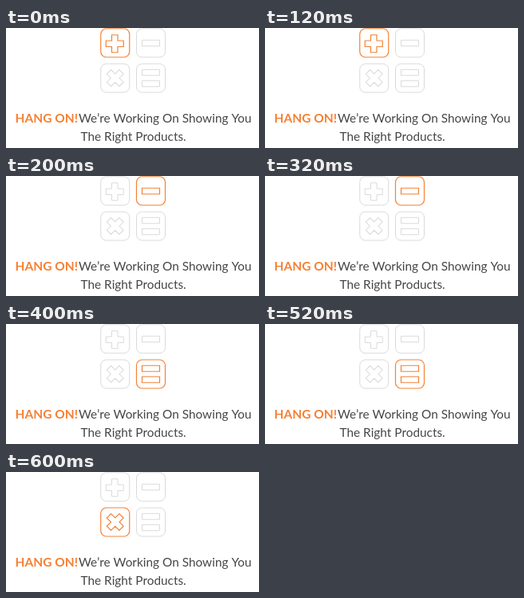
Write an HTML page with a canvas that moves like this. It is 317 px wide and 151 px high and loops after 800 ms.

```html
<!DOCTYPE html>
<html lang="en">
<head>
<meta charset="utf-8">
<style>
html, body { margin: 0; width: 100%; height: 100%; overflow: hidden; background: #fff; }
canvas { display: block; }
</style>
</head>
<body>
<canvas id="stage" width="317" height="151"></canvas>
<script>
const ctx = document.getElementById('stage').getContext('2d');
const ORANGE = '#f58134', GRAY = '#dadada', INK = '#464646';
const STEP = 200;

function bar(y) {
  ctx.rect(-11, y - 3.75, 22, 7.5);
}

function cross(arm, half) {
  for (let i = 0; i < 4; i++) {
    ctx.lineTo(-half, -half);
    ctx.lineTo(-half, -arm);
    ctx.lineTo(half, -arm);
    ctx.rotate(Math.PI / 2);
  }
  ctx.closePath();
}

// Keys in the order they light up, clockwise
const keys = [
  { x: 136.75, y: 18.75, sign() { ctx.translate(-0.5, 1); cross(11, 3.75); } },
  { x: 181.5, y: 18.75, sign() { bar(0.25); } },
  { x: 181.5, y: 63, sign() { bar(-7); bar(7); } },
  { x: 136.75, y: 63, sign() { ctx.rotate(Math.PI / 4); cross(11, 3.75); } }
];

function drawKey(key, lit) {
  ctx.save();
  ctx.translate(key.x, key.y);
  ctx.strokeStyle = lit ? ORANGE : GRAY;
  ctx.lineWidth = lit ? 1.2 : 1;
  ctx.beginPath();
  ctx.roundRect(-18, -18, 36, 36, 7);
  ctx.stroke();
  ctx.beginPath();
  key.sign();
  ctx.stroke();
  ctx.restore();
}

function label(text, x, y, weight, color, size) {
  ctx.font = `${weight} ${size}px Lato, sans-serif`;
  ctx.fillStyle = color;
  ctx.fillText(text, x, y);
}

function draw() {
  const active = Math.floor(performance.now() / STEP) % keys.length;
  ctx.fillStyle = '#fff';
  ctx.fillRect(0, 0, 317, 151);
  keys.forEach((key, i) => drawKey(key, i === active));
  label('HANG ON!', 11.5, 119, 700, ORANGE, 15.5);
  label('We’re Working On Showing You', 91, 119, 400, INK, 15.4);
  label('The Right Products.', 93.5, 142, 400, INK, 15.4);
  requestAnimationFrame(draw);
}
draw();
</script>
</body>
</html>
```
